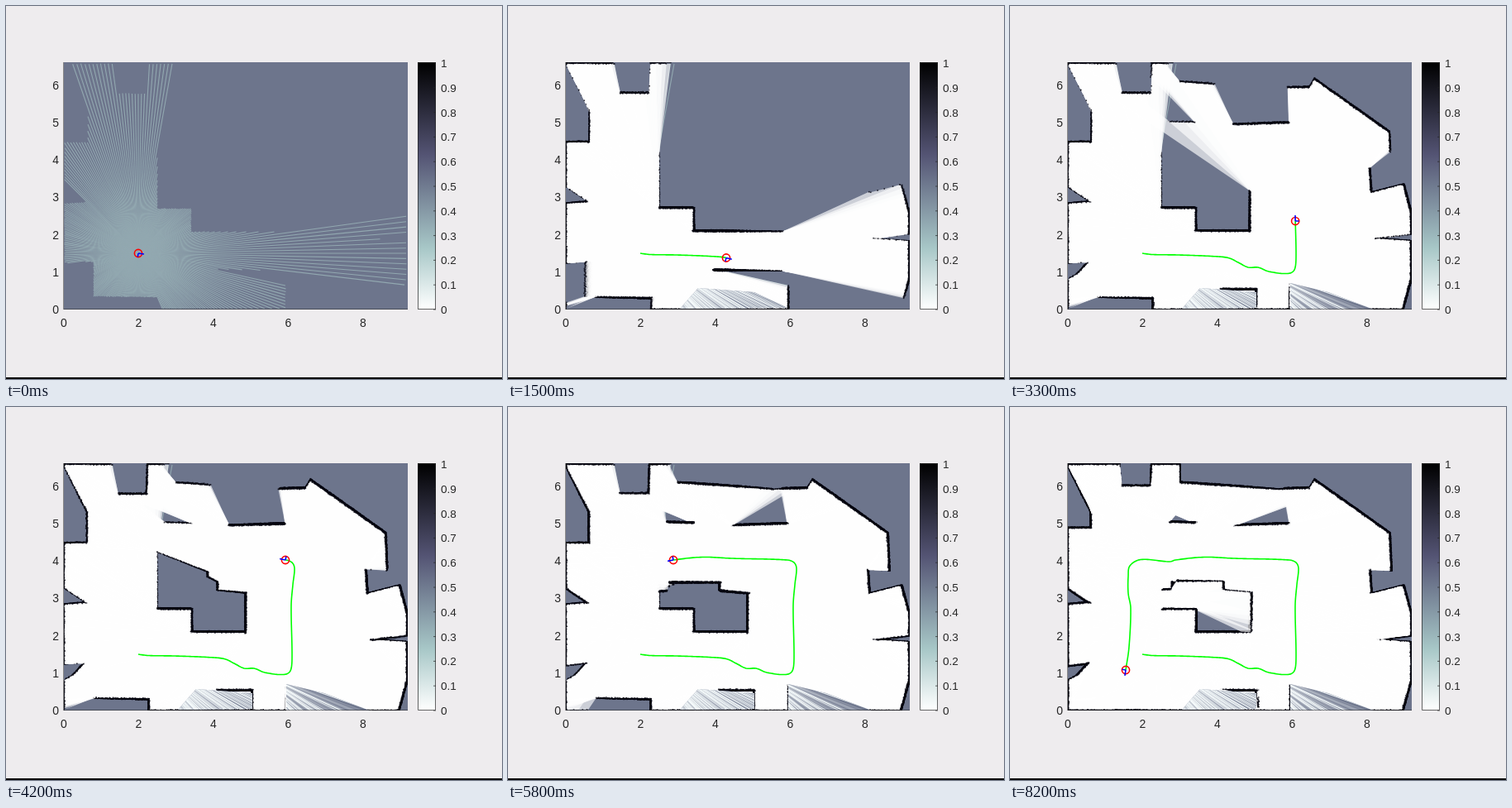
Animation of 600x451 px, one loop 8300 ms. Source, as an HTML page with a canvas:

```html
<!DOCTYPE html>
<html lang="en">
<head>
<meta charset="utf-8">
<title>Occupancy grid mapping</title>
<style>
html, body { margin: 0; width: 600px; height: 451px; overflow: hidden; background: #eeecee }
canvas { display: block }
</style>
</head>
<body>
<canvas id="stage" width="600" height="451"></canvas>
<script>
// A robot drives a loop through a room; each scan clears what it can see.
const ctx = document.getElementById('stage').getContext('2d');
const map = document.createElement('canvas').getContext('2d');
map.canvas.width = 600;
map.canvas.height = 451;

const GREY = 'rgb(109,117,140)', INK = '#262626';
const STEP = 100, STEPS = 83;
const PLOT = [70, 68, 416, 299];

// Way points: step, x, y
const route = [
  [0, 160, 299], [2, 172, 300.5], [7, 203, 301], [12, 243, 302.5], [15, 264, 304.5], [17, 276, 310],
  [18.5, 288, 316], [20, 300, 316], [22, 313, 321], [25, 335, 323.5], [27, 344, 319], [28.5, 346, 305],
  [35, 345, 240], [37.5, 347, 215], [40, 349, 195], [41, 346, 188], [42, 338, 185], [50, 270, 183],
  [54, 235, 181.5], [58, 200, 185], [59, 193, 187], [63, 158, 184.5], [65, 145, 192], [67, 143, 205],
  [69.5, 143, 225], [72, 146, 243], [78, 144, 290], [82, 140, 318]
];

const mix = (a, b, k) => a + (b - a) * k;
const clamp = (v, lo, hi) => Math.min(hi, Math.max(lo, v));
const ramp = (step, from, to) => clamp((step - from) / (to - from), 0, 1);

let seed = 1;
function random() {
  seed = (seed * 16807) % 2147483647;
  return seed / 2147483647;
}

// Smooth curve through the way points
function position(step) {
  const last = route.length - 1;
  step = clamp(step, 0, route[last][0]);
  const i = Math.max(0, route.findIndex(p => p[0] >= step) - 1);
  const a = route[i], b = route[i + 1], span = b[0] - a[0], k = (step - a[0]) / span;
  const slope = (n, axis) => {
    const p = route[Math.max(0, n - 1)], q = route[Math.min(last, n + 1)];
    return (q[axis] - p[axis]) / (q[0] - p[0]) * span;
  };
  return [1, 2].map(axis => mix(a[axis], b[axis], k * k * (3 - 2 * k)) +
    k * (1 - k) * ((1 - k) * slope(i, axis) - k * slope(i + 1, axis)));
}

// Obstacles as the robot believes them; some shrink once seen from closer
function obstacles(step) {
  const right = mix(332, 291, ramp(step, 16, 30)), ridge = ramp(step, 44, 56);
  const hood = mix(245, 195, ridge), notch = mix(106, 96, ramp(step, 56, 76));
  const shelf = mix(165, 147, ramp(step, 60, 72)), corner = mix(106, 72, ramp(step, 8, 28));
  const shapes = [
    [[71, 70], [205, 70], [205, 92], [322, 100], [362, 99], [368, 89], [458, 153], [460, 198], [434, 196],
      [436, 226], [475, 216], [484, 250], [484, 330], [474, 366], [71, 366], [71, 70]],
    [[183, mix(175, 222, ridge)], [hood, mix(199, 221, ridge)], [hood, mix(205, 211, ridge)], [257, 211],
      [257, 221], [right, 224], [right, 273], [224, 273], [224, 245], [183, 245], [183, 175]],
    [[133, 70], [135, notch], [171, notch], [172, 70]],
    [[71, 73], [99, 127], [99, shelf], [71, shelf]],
    [[71, 219], [98, 237], [71, 239]],
    [[71, 312], [96, 309], [82, 324], [71, 330]],
    [[484, 276], [440, 281], [484, 284]],
    [[192, 140], [225, 141]],
    [[270, 144], [338, 142]],
    [[338, 335], [338, 366]],
    step < 16 ? [[249, 318], [332, 320]] : [[255, 341], [299, 341], [299, 363]]
  ];
  if (ridge) shapes[1].pop();
  if (step < 28) shapes.push([[71, 311], [corner, 309], [corner, 351]]);
  if (step < 70) shapes.push([[106, 351], [mix(182, 174, ramp(step, 7, 15)), 352], [174, 366]]);
  return shapes.flatMap(s => s.slice(1).map((p, i) => [s[i], p]));
}

function castRay(x, y, c, s, walls) {
  let range = 500;
  for (const [p, q] of walls) {
    const dx = q[0] - p[0], dy = q[1] - p[1], px = p[0] - x, py = p[1] - y;
    const det = c * dy - s * dx, t = (px * dy - py * dx) / det, u = (px * s - py * c) / det;
    if (t > 0 && t < range && u >= 0 && u <= 1) range = t;
  }
  return range;
}

function trace(g, points) {
  g.beginPath();
  points.forEach(p => g.lineTo(...p));
}

function line(g, x1, y1, x2, y2) {
  g.beginPath();
  g.moveTo(x1, y1);
  g.lineTo(x2, y2);
  g.stroke();
}

function scan(step) {
  seed = 1000 + step * 77;
  const [x, y] = position(step), walls = obstacles(step), count = step ? 900 : 320;
  const free = [], hits = [], offset = random();
  for (let i = 0; i < count; i++) {
    const angle = (i + offset) * 2 * Math.PI / count, c = Math.cos(angle), s = Math.sin(angle);
    const range = castRay(x, y, c, s, walls) + random() - .5, depth = range + random() * 2;
    free.push([x + range * c, y + range * s]);
    hits.push([x + depth * c, y + depth * s]);
  }
  if (step === 0) {
    map.strokeStyle = 'rgb(146,168,176)';
    map.lineWidth = 1.1;
    free.forEach(p => line(map, x, y, ...p));
    return;
  }
  trace(map, free);
  map.fillStyle = 'rgba(255,255,255,.65)';
  map.fill();
  map.fillStyle = 'rgba(8,8,18,.8)';
  hits.forEach(p => map.fillRect(p[0] - .8, p[1] - .8, 1.6, 1.6));
}

let scanned = -1;
function updateMap(step) {
  if (step < scanned) scanned = -1;
  if (scanned < 0) {
    map.fillStyle = GREY;
    map.fillRect(0, 0, 600, 451);
  }
  while (scanned < step) scan(++scanned);
}

// Sparsely scanned floor: light streaks from one viewpoint, sparser for a higher power
function streaks(points, x, y, power) {
  seed = 99;
  ctx.save();
  trace(ctx, points);
  ctx.clip();
  ctx.fillStyle = GREY;
  ctx.fillRect(...PLOT);
  ctx.lineWidth = 1.3;
  for (let a = 0; a < 1.6; a += .009) {
    ctx.strokeStyle = `rgba(250,255,255,${random() ** power})`;
    line(ctx, x, y, x + 300 * Math.cos(a), y + 300 * Math.sin(a));
  }
  ctx.restore();
}

function drawMap(step) {
  updateMap(step);
  ctx.save();
  ctx.beginPath();
  ctx.rect(...PLOT);
  ctx.clip();
  ctx.drawImage(map.canvas, 0, 0);
  if (step) {
    const k = ramp(step, 2, 12);
    streaks([[mix(204, 230, k), mix(318, 341, k)], [mix(249, 298, k), mix(318, 346, k)],
      [mix(338, 298, ramp(step, 16, 28)), 365], [208, 366]], 150, 285, .4);
  }
  if (step > 20) streaks([[339, 335], [385, 346], [440, 367], [339, 367]], 295, 316, 2);
  ctx.restore();
}

function drawRobot(step) {
  const [x, y] = position(step), [x0, y0] = position(step - 1), [x1, y1] = position(step + 1);
  const angle = Math.atan2(y1 - y0, x1 - x0), c = Math.cos(angle), s = Math.sin(angle);
  const trail = [];
  for (let t = 0; t <= step; t += .25) trail.push(position(t));
  ctx.lineJoin = 'round';
  ctx.lineWidth = 1.6;
  ctx.strokeStyle = '#0f0';
  trace(ctx, trail);
  ctx.stroke();
  ctx.strokeStyle = '#f00';
  ctx.beginPath();
  ctx.arc(x, y, 4.6, 0, 7);
  ctx.stroke();
  ctx.strokeStyle = '#00f';
  line(ctx, x, y, x + 7 * c, y + 7 * s);
  line(ctx, x, y, x - 4.5 * s, y + 4.5 * c);
}

function label(text, x, y, align, size) {
  ctx.font = `${size}px "Liberation Sans", Arial, sans-serif`;
  ctx.textAlign = align;
  ctx.fillStyle = INK;
  ctx.fillText(text, x, y);
}

function drawAxes() {
  ctx.strokeStyle = 'rgba(38,38,38,.5)';
  ctx.lineWidth = 1;
  line(ctx, 70, 366.5, 486, 366.5);
  line(ctx, 69.5, 68, 69.5, 367);
  for (let v = 0; v <= 8; v += 2) label(v, 70 + v * 45.25, 387.5, 'center', 14);
  for (let v = 0; v <= 6; v++) label(v, 64, 372 - v * 45.2, 'right', 14);

  const bar = ctx.createLinearGradient(0, 367, 0, 68);
  [[0, '#fff'], [.25, 'rgb(167,199,199)'], [.625, 'rgb(84,84,116)'], [1, '#000']]
    .forEach(stop => bar.addColorStop(...stop));
  ctx.fillStyle = bar;
  ctx.fillRect(498, 68, 22, 299);
  ctx.strokeStyle = 'rgba(38,38,38,.7)';
  ctx.strokeRect(498.5, 68.5, 21, 298);
  for (let i = 0; i <= 10; i++) {
    const y = 367 - i * 29.8;
    line(ctx, 517, y, 520, y);
    label(i / 10, 526, y + 5, 'left', 13.5);
  }
  ctx.fillStyle = '#000';
  ctx.fillRect(0, 449, 600, 2);
}

function draw(step) {
  ctx.fillStyle = '#eeecee';
  ctx.fillRect(0, 0, 600, 451);
  drawMap(step);
  drawAxes();
  drawRobot(step);
}

let shown = -1;
function tick() {
  const step = Math.floor(performance.now() / STEP) % STEPS;
  if (step !== shown) draw(shown = step);
  requestAnimationFrame(tick);
}
tick();
</script>
</body>
</html>
```
